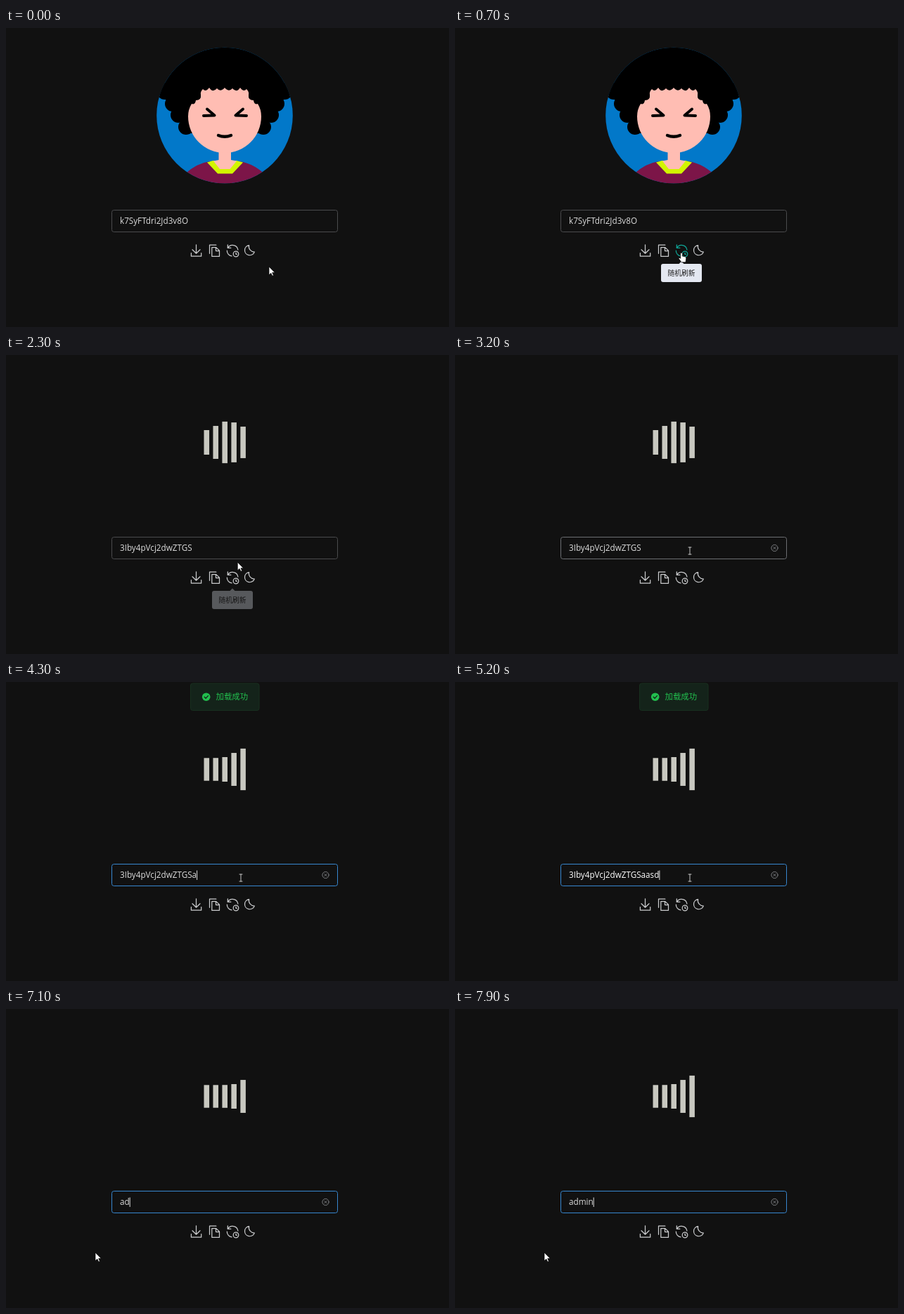
These frames come from a looping animation (630 px wide and 426 px high, 8 s). An HTML page:

```html
<!DOCTYPE html>
<html lang="zh">
<head>
<meta charset="utf-8">
<style>
  html, body { margin: 0; width: 100%; height: 100%; overflow: hidden; background: #111; }
  svg { display: block; width: 630px; height: 426px; }
  .line { fill: none; stroke-linecap: round; stroke-linejoin: round; }
  .zh { font-family: "Noto Sans CJK SC", "Noto Sans CJK", sans-serif; }
  #value { font: 11.7px "Open Sans", "Noto Sans", sans-serif; white-space: pre; }
</style>
</head>
<body>
<svg viewBox="0 0 630 426">
  <defs>
    <clipPath id="round"><circle cx="311" cy="124.5" r="96.8"/></clipPath>
    <g id="curls">
      <circle cx="226" cy="90" r="12"/>
      <circle cx="237" cy="108" r="11"/>
      <circle cx="245" cy="124" r="11"/>
      <circle cx="256" cy="141" r="11"/>
    </g>
    <path id="eye" class="line" stroke="#000" stroke-width="4" d="M286 115.5L296.5 124.5L281 125"/>
  </defs>

  <g id="avatar" clip-path="url(#round)">
    <path fill="#0278c9" d="M214 27h194v195H214z"/>
    <path d="M214 27H408V92L385 110L360 150H262L237 110L214 92Z"/>
    <use href="#curls"/>
    <use href="#curls" transform="matrix(-1 0 0 1 622 0)"/>
    <path fill="#7c1548" d="M248 214Q268 193 290 190H332Q354 193 374 214V225H248Z"/>
    <path fill="#d2f500" d="M286 191.5L301 207.5H322L337 191.5L328 189H294Z"/>
    <path fill="#ffbdb3" d="M302.5 170H320V188L328 189.5L318.5 201H304L295 189.5L302.5 188Z"/>
    <path fill="#ffbdb3" d="M259 126Q259 116 264 108Q269 110 270 103Q278 103 277 95Q276 91 280 87
      Q284 92 289 85Q294 93 300 86Q305 92 311 85Q317 92 322 86Q328 93 333 85Q338 92 342 87
      Q346 91 345 95Q344 103 352 103Q353 110 358 108Q363 116 363 126A52 52 0 0 1 259 126Z"/>
    <use href="#eye"/>
    <use href="#eye" transform="matrix(-1 0 0 1 623 0)"/>
    <path class="line" stroke="#000" stroke-width="4.4" d="M302 153Q311 156.5 320 153"/>
  </g>

  <g id="loader" fill="#c8c8c0" transform="translate(278.8 92.1) scale(2.7)"></g>

  <rect id="field" x="150.5" y="259.5" width="321" height="31" rx="3" fill="none"/>
  <rect id="marked" y="268" height="14.5" fill="#0b62d6"/>
  <text id="value" x="162" y="279.3"></text>
  <rect id="caret" y="268.5" width="1" height="13.5" fill="#ddd"/>
  <g id="clear" class="line" stroke="#85878b" stroke-width=".9">
    <circle cx="454.5" cy="275" r="4.6"/>
    <path d="M452.9 273.4l3.2 3.2m0-3.2l-3.2 3.2"/>
  </g>

  <g class="line" stroke="#c9cacc" stroke-width="1.25">
    <path d="M270.5 308.8V321M265 315.8L270.5 321.2L276 315.8M263.4 320.5V325.2H277.7V320.5"/>
    <path d="M289.5 321.3V309.2H298.8M292.8 325.3V312.6H298.8L303.5 317.3V325.3ZM298.5 312.8V317.5H303.3"/>
    <path id="refresh" d="M315.3 308.9V313.4H319.8M315.5 313.2A7.8 7.8 0 0 1 329.9 316
      M314.3 317.2A7.8 7.8 0 0 0 321 324.9M323.2 322a3.8 3.8 0 1 0 7.6 0a3.8 3.8 0 1 0-7.6 0M327 320v2.3h1.4"/>
    <path d="M345.6 309.6A7.1 7.1 0 1 0 353.3 319A7.6 7.6 0 0 1 345.6 309.6Z"/>
  </g>

  <g id="tip">
    <rect x="293" y="336" width="58" height="26" rx="3" fill="#e4e8f1"/>
    <path fill="#e4e8f1" d="M318 336.5l4-4l4 4z"/>
    <text class="zh" x="322" y="352.6" font-size="9.75" text-anchor="middle" fill="#1c1c1c">随机刷新</text>
  </g>

  <g id="message">
    <rect x="262.5" y="2" width="97.5" height="38.5" rx="3" fill="#14231a" stroke="#18301f"/>
    <circle cx="284.7" cy="21.2" r="5.8" fill="#22bf4e"/>
    <path class="line" stroke="#14231a" stroke-width="1.3" d="M282.2 21.3L284.1 23.2L287.4 19.6"/>
    <text class="zh" x="298.5" y="25.3" font-size="11.4" fill="#22bf4e">加载成功</text>
  </g>

  <g id="cursor">
    <path fill="#fff" stroke="#000" stroke-width=".7" d="M0 0V11.8L2.8 9.3L4.7 13.2L6.5 12.4L4.7 8.6H8.4Z"/>
    <path fill="#fff" stroke="#000" stroke-width=".7"
      d="M-1.3 1Q0-.8 1.3 1V5L5.6 6Q6.9 6.6 6.8 8L6 13.8H0L-3.8 8.6Q-3.8 7-2.2 7.5L-1.3 8.4Z"/>
    <path class="line" stroke="#c4c4c4" stroke-width="1" d="M-2-5H2M0-5V5M-2 5H2"/>
  </g>
</svg>

<script>
const LOOP = 8000, STEP = 100, TEXT_X = 162;
const $ = id => document.getElementById(id);
const show = (el, on) => el.setAttribute("visibility", on ? "visible" : "hidden");
const clamp = v => Math.min(1, Math.max(0, v));
const ramp = (t, from, to) => clamp((t - from) / (to - from));
const smooth = p => p * p * (3 - 2 * p);
const within = (t, from, to) => t >= from && t < to;

// time, x, y of the pointer
const route = [
  [100, 374, 340], [500, 322, 320], [1900, 322, 320], [2600, 334, 279],
  [5200, 334, 279], [5900, 124, 279], [6600, 124, 279], [6900, 127, 293], [7000, 127, 347]
];
// time, content of the field
const typing = [
  [0, "k7SyFTdri2Jd3v8O"], [1000, "3Iby4pVcj2dwZTGS"],
  [4300, "3Iby4pVcj2dwZTGSa"], [4500, "3Iby4pVcj2dwZTGSaa"],
  [4700, "3Iby4pVcj2dwZTGSaas"], [4900, "3Iby4pVcj2dwZTGSaasd"],
  [6800, "a"], [7000, "ad"], [7300, "adm"], [7500, "admi"], [7700, "admin"]
];

const bars = Array.from({ length: 5 }, (_, i) => {
  const bar = document.createElementNS("http://www.w3.org/2000/svg", "rect");
  bar.setAttribute("x", 1 + 4.8 * i);
  bar.setAttribute("width", 2.8);
  $("loader").append(bar);
  return bar;
});

const bezier = (a, b, s) => 3 * a * s * (1 - s) ** 2 + 3 * b * s * s * (1 - s) + s ** 3;

// cubic-bezier(.36, .61, .3, .98)
function easeOut(p) {
  let lo = 0, hi = 1;
  for (let i = 0; i < 20; i++) {
    const mid = (lo + hi) / 2;
    if (bezier(.36, .3, mid) < p) lo = mid; else hi = mid;
  }
  return bezier(.61, .98, lo);
}

function drawLoader(t) {
  show($("loader"), t >= 1000);
  const seconds = (within(t, 3900, 4300) ? 3900 : t) / 1000;
  bars.forEach((bar, i) => {
    const p = (seconds + .87 - .1 * i + .9) % .9 / .3;
    const swell = p < 1 ? easeOut(p) : p < 2 ? 1 - easeOut(p - 1) : 0;
    bar.setAttribute("y", 6 - 5 * swell);
    bar.setAttribute("height", 12 + 10 * swell);
  });
}

function pointerAt(t) {
  const n = route.findIndex(k => k[0] > t);
  if (n === 0) return route[0].slice(1);
  if (n < 0) return route.at(-1).slice(1);
  const [t0, x0, y0] = route[n - 1], [t1, x1, y1] = route[n];
  const p = smooth(ramp(t, t0, t1));
  return [x0 + (x1 - x0) * p, y0 + (y1 - y0) * p];
}

function drawField(t, x, hover) {
  const focus = t >= 3700, selecting = within(t, 5200, 6800);
  const value = $("value");
  value.textContent = typing.findLast(k => k[0] <= t)[1];
  value.setAttribute("fill", selecting ? "#fff" : "#dcdcdc");
  const end = TEXT_X + value.getComputedTextLength();
  const start = selecting ? Math.min(end, Math.max(TEXT_X, x)) : end;
  $("marked").setAttribute("x", start);
  $("marked").setAttribute("width", end - start);
  $("caret").setAttribute("x", end);
  show($("caret"), focus && start === end);
  show($("clear"), focus || hover);
  $("field").setAttribute("stroke", focus ? "#3787d0" : hover ? "#6c6e72" : "#4a4b4d");
}

function draw(t) {
  const [x, y] = pointerAt(t);
  const onField = within(x, 150, 472) && within(y, 259, 291);
  const onIcon = Math.hypot(x - 322, y - 317) < 9;
  show($("avatar"), t < 1000);
  drawLoader(t);
  drawField(t, x, onField);

  $("refresh").setAttribute("stroke", onIcon ? "#0fa596" : "#c9cacc");
  $("tip").setAttribute("opacity", ramp(t, 400, 700) - ramp(t, 2100, 2400));

  const shown = smooth(ramp(t, 3200, 3600)) - smooth(ramp(t, 6300, 6700));
  $("message").setAttribute("opacity", shown);
  $("message").setAttribute("transform", `translate(0 ${-40 * (1 - shown)})`);

  const kind = onField ? 2 : onIcon ? 1 : 0;
  [...$("cursor").children].forEach((shape, i) => show(shape, i === kind));
  $("cursor").setAttribute("transform", `translate(${x} ${y})`);
}

function tick() {
  const t = performance.now() % LOOP;
  draw(Math.floor(t / STEP) * STEP);
  requestAnimationFrame(tick);
}
tick();
</script>
</body>
</html>
```
